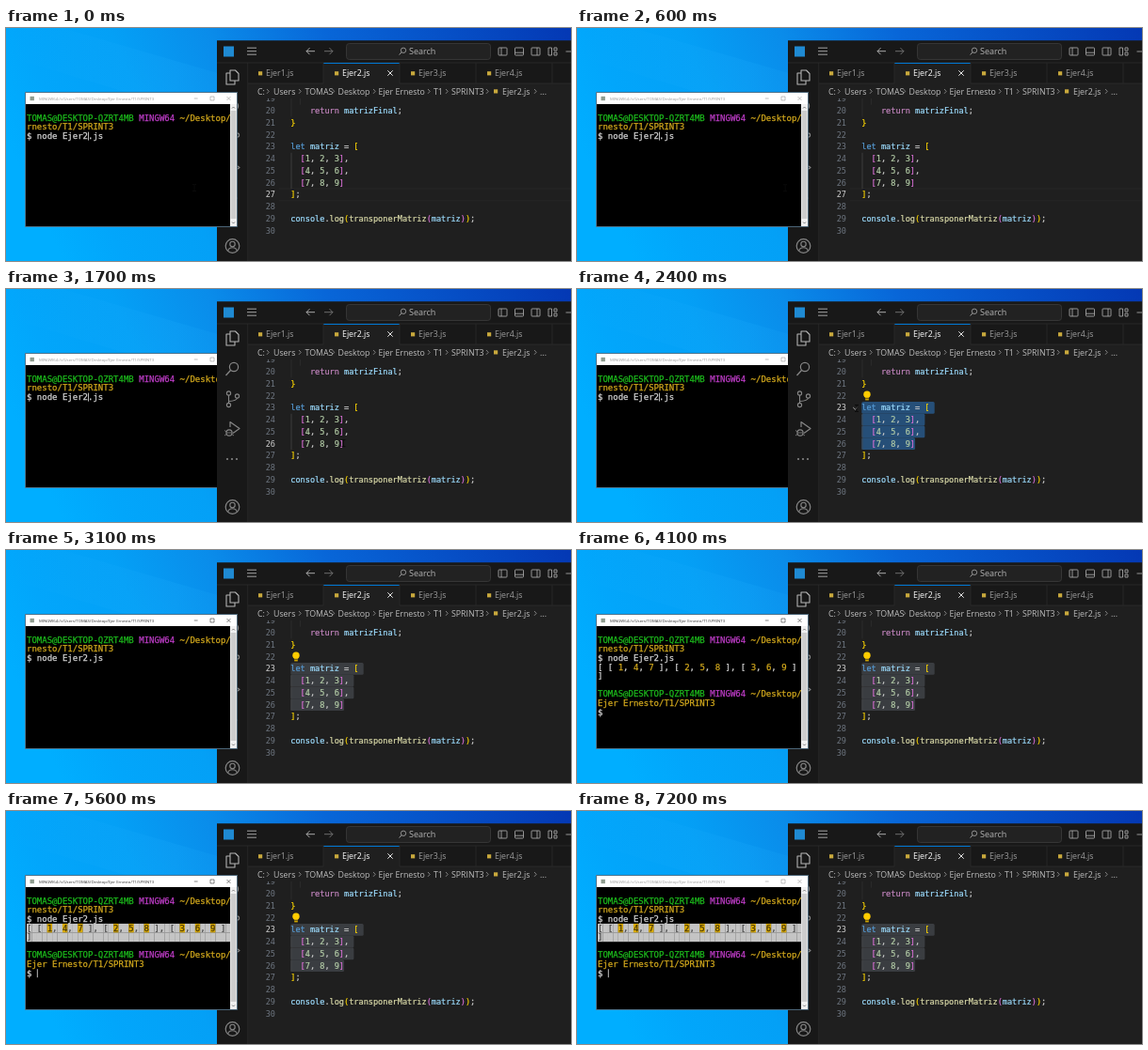
Write an HTML page that moves like this. It is 600 by 248 pixels and loops after 7300 ms.

```html
<!DOCTYPE html>
<html lang="es">
<head>
<meta charset="utf-8">
<title>Matriz transpuesta</title>
<style>
html, body { margin: 0; width: 100%; height: 100%; overflow: hidden; background: #0a9cf4; }
svg { display: block; width: 600px; height: 248px; }
text { white-space: pre; }
.mono { font: 8.57px "DejaVu Sans Mono", monospace; stroke-width: .2; }
.term { font: 9px "DejaVu Sans Mono", monospace; stroke-width: .25; }
.ui { font-family: "Open Sans", "Noto Sans", sans-serif; }
</style>
</head>
<body>
<svg id="stage" viewBox="0 0 600 248">
  <defs>
    <linearGradient id="sky" gradientUnits="userSpaceOnUse" x1="60" y1="248" x2="600" y2="0">
      <stop offset="0" stop-color="#00aeff"/>
      <stop offset=".1" stop-color="#02a6fb"/>
      <stop offset=".25" stop-color="#04a0f6"/>
      <stop offset=".41" stop-color="#0a8cea"/>
      <stop offset=".6" stop-color="#0866d8"/>
      <stop offset="1" stop-color="#0438b4"/>
    </linearGradient>
    <linearGradient id="beam" x1="0" y1="0" x2="1" y2="0">
      <stop offset="0" stop-color="#20b0ff" stop-opacity="0"/>
      <stop offset=".6" stop-color="#20b0ff" stop-opacity=".18"/>
      <stop offset="1" stop-color="#20b0ff" stop-opacity="0"/>
    </linearGradient>
    <clipPath id="pane"><rect x="257" y="75" width="343" height="173"/></clipPath>
  </defs>
  <rect width="600" height="248" fill="url(#sky)"/>
  <path d="M60 0L300 70V120L0 30V0Z" fill="url(#beam)"/>
  <g id="windows"></g>
  <path id="mouse" d="M-2 -3.5H2M0 -3.5V3.5M-2 3.5H2" fill="none" stroke="#0b0b0b" stroke-width=".9"/>
</svg>
<script>
const NS = 'http://www.w3.org/2000/svg';
const LOOP = 7300;
const windows = document.getElementById('windows');
const mouse = document.getElementById('mouse');

function el(parent, tag, attrs = {}, text) {
  const node = document.createElementNS(NS, tag);
  for (const k in attrs) node.setAttribute(k, attrs[k]);
  if (text !== undefined) node.textContent = text;
  parent.append(node);
  return node;
}
const rect = (p, x, y, width, height, fill, more) => el(p, 'rect', { x, y, width, height, fill, ...more });
const line = (p, d, stroke, w = 1) =>
  el(p, 'path', { d, stroke, fill: 'none', 'stroke-width': w, 'stroke-linejoin': 'round' });
const label = (p, x, y, size, fill, text) =>
  el(p, 'text', { x, y, fill, class: 'ui', 'font-size': size }, text);
const show = (node, on) => node.setAttribute('visibility', on ? 'inherit' : 'hidden');

// A row of text whose parts are [text, colour]
function row(p, cls, x, y, parts) {
  const t = el(p, 'text', { x, y, class: cls });
  for (const [s, fill] of parts) el(t, 'tspan', { fill, stroke: fill }, s);
  return t;
}

/* ---------- editor window ---------- */
const editor = el(windows, 'g');
const X0 = 302.3, CW = 5.16, LH = 12.77;
const midY = n => 88 + LH * (n - 20);
const C = { key: '#569cd6', ctl: '#c586c0', id: '#9cdcfe', fn: '#dcdcaa', num: '#b5cea8',
  b1: '#ffd700', b2: '#da70d6', txt: '#cccccc' };

rect(editor, 224, 13.5, 376, 235, '#1f1f1f');
rect(editor, 224, 13.5, 376, 23.5, '#181818');
rect(editor, 224, 37, 33, 211, '#181818');
rect(editor, 257, 37, 343, 22, '#181818');
line(editor, 'M224 37H600M256.7 37V248M257 59H600', '#2b2b2b', .8);

// title bar
rect(editor, 231, 19.5, 11, 11, '#1f8ad2');
line(editor, 'M256 21.2H266M256 24.7H266M256 28.2H266', '#b0b0b0', .9);
line(editor, 'M328 24.7H319M322.5 21.2L319 24.7L322.5 28.2', '#b8b8b8', .9);
line(editor, 'M338 24.7H347M343.5 21.2L347 24.7L343.5 28.2', '#777', .9);
rect(editor, 361.5, 16.5, 153, 17, '#222222', { rx: 3, stroke: '#3c3c3c', 'stroke-width': .8 });
el(editor, 'circle', { cx: 422, cy: 23.8, r: 2.7, fill: 'none', stroke: '#aaa', 'stroke-width': .8 });
line(editor, 'M420 25.8L417.6 28.5', '#aaa', .9);
label(editor, 428, 28.1, 9, '#b4b4b4', 'Search');
for (const [x, divider] of [[527.5, 'M526 21V29'], [545, 'M540.5 26.2H549.5'], [562.5, 'M564 21V29']]) {
  rect(editor, x - 4.5, 21, 9, 8, 'none', { stroke: '#b4b4b4', 'stroke-width': .8, rx: .8 });
  line(editor, divider, '#b4b4b4', .8);
}
line(editor, 'M576 21H579.5V29H576ZM582 21H585V24H582ZM582 26H585V29H582ZM594.5 25H600', '#b4b4b4', .8);

// activity bar
const grey = '#868686';
line(editor, 'M238 45H243.5L247 48.5V56H238ZM238 48H234V60H243V56', '#b4b4b4', 1.1);
el(editor, 'circle', { cx: 242, cy: 83, r: 4.6, fill: 'none', stroke: grey, 'stroke-width': 1.2 });
line(editor, 'M238.7 86.3L233.5 92', grey, 1.3);
for (const [cx, cy] of [[236.5, 111], [236.5, 123.5], [245.5, 114]])
  el(editor, 'circle', { cx, cy, r: 2.1, fill: 'none', stroke: grey, 'stroke-width': 1.1 });
line(editor, 'M236.5 113V121.4M245.5 116Q245 119 236.5 119.5', grey, 1.1);
line(editor, 'M238 147V141.5L248 148.5L241 153.5', grey, 1.2);
el(editor, 'circle', { cx: 237, cy: 153, r: 3.1, fill: 'none', stroke: grey, 'stroke-width': 1.1 });
line(editor, 'M232 150.5L234.2 152M232 156L234.2 154.5M242 156L239.8 154.5M234 153H240', grey, .8);
for (const cx of [235, 240, 245]) el(editor, 'circle', { cx, cy: 181, r: 1.1, fill: grey });
el(editor, 'circle', { cx: 240.5, cy: 232, r: 7.3, fill: 'none', stroke: grey, 'stroke-width': 1.2 });
el(editor, 'circle', { cx: 240.5, cy: 230, r: 2.7, fill: 'none', stroke: grey, 'stroke-width': 1.1 });
line(editor, 'M235.8 237Q236.5 233.7 240.5 233.7T245.2 237', grey, 1.1);

// tabs and breadcrumb
const TAB = 81;
const fileMark = (x, y) => rect(editor, x, y, 4.2, 4.2, '#c8a83c');
rect(editor, 337, 37, TAB, 23, '#1f1f1f');
rect(editor, 337, 37, TAB, 1, '#0078d4');
for (let i = 0; i < 4; i++) {
  const x = 276 + TAB * i;
  line(editor, `M${x + 61} 37V59`, '#2b2b2b', .8);
  fileMark(x - 8, 46.2);
  label(editor, x, 51.2, 8.8, i === 1 ? '#ffffff' : '#9d9d9d', `Ejer${i + 1}.js`);
}
line(editor, 'M405.3 45.3L410.7 50.7M410.7 45.3L405.3 50.7', '#e4e4e4', 1);

const crumbs = [[267, 'C:'], [284, 'Users'], [317.5, 'TOMAS'], [352.5, 'Desktop'], [395.5, 'Ejer Ernesto'],
  [454, 'T1'], [473, 'SPRINT3'], [527, 'Ejer2.js'], [567, '...']];
for (const [x, s] of crumbs) label(editor, x, 70.6, 8.8, '#bdbdbd', s);
for (const x of [278, 312, 347.5, 391, 449, 468, 511, 562])
  line(editor, `M${x - 1} 65L${x + 1.2} 67.4L${x - 1} 69.8`, '#9a9a9a', .8);
fileMark(518, 65.3);

// code
const pane = el(editor, 'g', { 'clip-path': 'url(#pane)' });
const current = line(pane, '', '#282828', .8);
const picks = [23, 24, 25, 26].map(() => rect(pane, 0, 0, 0, LH + .1, '#264f78', { rx: 1.5 }));
line(pane, `M303 ${midY(23) + LH / 2}V${midY(26) + LH / 2}`, '#4a4a4a', .7);
line(pane, `M303 75V${midY(20) + LH / 2}M312.6 75V${midY(19) + LH / 2}`, '#333', .7);

const cells = (a, b, c, end) => [['  ', C.txt], ['[', C.b2], [a, C.num], [', ', C.txt], [b, C.num],
  [', ', C.txt], [c, C.num], [']', C.b2], [end, C.txt]];
const code = {
  20: [['    ', C.txt], ['return', C.ctl], [' ', C.txt], ['matrizFinal', C.id], [';', C.txt]],
  21: [['}', C.b1]],
  23: [['let', C.key], [' ', C.txt], ['matriz', C.id], [' = ', C.txt], ['[', C.b1]],
  24: cells(1, 2, 3, ','),
  25: cells(4, 5, 6, ','),
  26: cells(7, 8, 9, ''),
  27: [[']', C.b1], [';', C.txt]],
  29: [['console', C.id], ['.', C.txt], ['log', C.fn], ['(', C.b1], ['transponerMatriz', C.fn],
    ['(', C.b2], ['matriz', C.id], [')', C.b2], [')', C.b1], [';', C.txt]]
};
const numbers = {};
for (let n = 19; n <= 30; n++) {
  const y = midY(n) + 3.1;
  numbers[n] = el(pane, 'text', { x: 286, y, class: 'mono', 'text-anchor': 'end' }, n);
  if (code[n]) row(pane, 'mono', X0, y, code[n]);
}
const fold = line(pane, 'M293.2 126L295.4 128.2L297.6 126', '#b8b8b8', .9);
const bulb = el(pane, 'g');
el(bulb, 'circle', { cx: 308, cy: 112.2, r: 3.7, fill: '#ffcc00' });
rect(bulb, 306.2, 115, 3.6, 3.4, '#d9ad00');
line(bulb, 'M306.2 116.6H309.8', '#1f1f1f', .6);

/* ---------- terminal window ---------- */
const term = el(windows, 'g');
const TX = 22, TW = 5.418, TH = 9.6, COLS = 40;
const baseY = i => 98.7 + TH * i;
const G = '#1cba1c', M = '#bd3cc6', Y = '#d2a81c', W = '#d4d4d4';

rect(term, 20.5, 68.5, 225, 143, '#000', { stroke: '#5c7c92', 'stroke-width': .8 });
rect(term, 21, 69, 224, 12, '#fff');
rect(term, 238, 81, 7, 130, '#f0f0f0');
rect(term, 238.6, 88, 5.8, 115, '#cdcdcd');
line(term, 'M240 85.5L241.5 84L243 85.5M240 206.5L241.5 208L243 206.5', '#606060', .8);
rect(term, 25.5, 72.8, 4.4, 4.4, '#8f9c8f');
const title = label(term, 35, 76.6, 4.28, '#999', 'MINGW64:/c/Users/TOMAS/Desktop/Ejer Ernesto/T1/SPRINT3');
const controls = line(term, 'M199.8 75H203.6M217 73H221V77H217ZM234.5 73L238.5 77M238.5 73L234.5 77', '#333', .6);

const prompt = [['TOMAS@DESKTOP-QZRT4MB', G], [' ', W], ['MINGW64', M], [' ~/Desktop/', Y]];
row(term, 'term', TX, baseY(0), prompt);
row(term, 'term', TX, baseY(1), [['rnesto/T1/SPRINT3', Y]]);
row(term, 'term', TX, baseY(2), [['$ node Ejer2.js', W]]);

const output = el(term, 'g');
const result = '[ [ 1, 4, 7 ], [ 2, 5, 8 ], [ 3, 6, 9 ]';
const isDigit = c => c >= '0' && c <= '9';
row(output, 'term', TX, baseY(3), [...result].map(c => [c, isDigit(c) ? Y : W]));
row(output, 'term', TX, baseY(4), [[']', W]]);
row(output, 'term', TX, baseY(6), prompt);
row(output, 'term', TX, baseY(7), [['Ejer Ernesto/T1/SPRINT3', Y]]);
row(output, 'term', TX, baseY(8), [['$', W]]);

// two rows of inverted cells, revealed one by one as the drag advances
const picked = result.padEnd(COLS) + ']'.padEnd(COLS);
const marks = [...picked].map((c, i) => {
  const g = el(output, 'g'), y = baseY(i < COLS ? 3 : 4), x = TX + TW * (i % COLS);
  const width = Math.min(TW + .15, 238 - x);
  rect(g, x, y - 7.6, width, TH + .1, isDigit(c) ? '#d9a900' : '#c4c4c4');
  if (c !== ' ') row(g, 'term', x, y, [[c, isDigit(c) ? '#4a3a08' : '#484848']]);
  return g;
});
const caret = rect(term, 0, 0, .9, 9, '#d0d0d0');

/* ---------- timeline ---------- */
const PICK = 1650, PICKED = 2200, BULB = 2300, FOCUS = 2650, RUN = 3650, DRAG = 4750, DRAGGED = 5350, BLUR = 6500;
const path = [[0, 200, 170], [500, 200, 170], [1000, 399, 172], [1300, 399, 172], [PICK, 360, 165],
  [PICKED, 297, 127], [2400, 297, 127], [FOCUS, 150, 150]];
const clamp = (v, a, b) => Math.min(b, Math.max(a, v));
const ease = k => k * k * (3 - 2 * k);

function mouseAt(t) {
  let i = 0;
  while (i < path.length - 2 && t > path[i + 1][0]) i++;
  const [t0, x0, y0] = path[i], [t1, x1, y1] = path[i + 1];
  const k = ease(clamp((t - t0) / (t1 - t0), 0, 1));
  return [x0 + (x1 - x0) * k, y0 + (y1 - y0) * k];
}

const lengths = { 23: 14, 24: 12, 25: 12, 26: 11 };

function render(t) {
  const [mx, my] = mouseAt(t);
  mouse.setAttribute('transform', `translate(${mx.toFixed(1)} ${my.toFixed(1)})`);
  show(mouse, t < FOCUS);

  const inEditor = t >= PICK && t < FOCUS;
  const front = inEditor ? editor : term;
  if (windows.lastChild !== front) windows.append(front);

  // editor selection grows backwards from the end of line 26
  const picking = t >= PICK;
  const head = picking ? clamp(Math.round(20 + (my - 88) / LH), 23, 26) : 27;
  const active = t < PICKED ? head : 23;
  const col = t < PICKED ? clamp(Math.round((mx - X0) / CW), 0, lengths[active] || 0) : 0;
  picks.forEach((r, i) => {
    const n = 23 + i, from = n === active ? col : 0;
    const to = lengths[n] + (n < 26 ? 1 : 0);
    show(r, picking && n >= active && to > from);
    r.setAttribute('x', X0 + from * CW);
    r.setAttribute('y', midY(n) - LH / 2);
    r.setAttribute('width', Math.max(0, to - from) * CW);
    r.setAttribute('fill', inEditor ? '#264f78' : '#3a3d41');
  });
  for (const n in numbers) numbers[n].setAttribute('fill', +n === active ? '#d0d0d0' : '#6e7681');
  const top = midY(27) - LH / 2;
  current.setAttribute('d', `M290 ${top}H600M290 ${top + LH}H600`);
  show(current, !picking);
  show(fold, inEditor && mx < X0);
  show(bulb, t >= BULB);

  // terminal
  const focused = t >= FOCUS && t < BLUR, ran = t >= RUN;
  title.setAttribute('fill', focused ? '#333' : '#999');
  controls.setAttribute('stroke', focused ? '#333' : '#999');
  show(output, ran);
  const count = Math.round(clamp((t - DRAG) / (DRAGGED - DRAG), 0, 1) * marks.length);
  marks.forEach((g, i) => show(g, ran && i < count));
  caret.setAttribute('x', TX + TW * (ran ? 2 : 12));
  caret.setAttribute('y', baseY(ran ? 8 : 2) - 7.3);
  show(caret, !focused || Math.floor((t - FOCUS) / 500) % 2 === 1);
}

const start = performance.now();
function tick() {
  render((performance.now() - start) % LOOP);
  requestAnimationFrame(tick);
}
tick();
</script>
</body>
</html>
```
